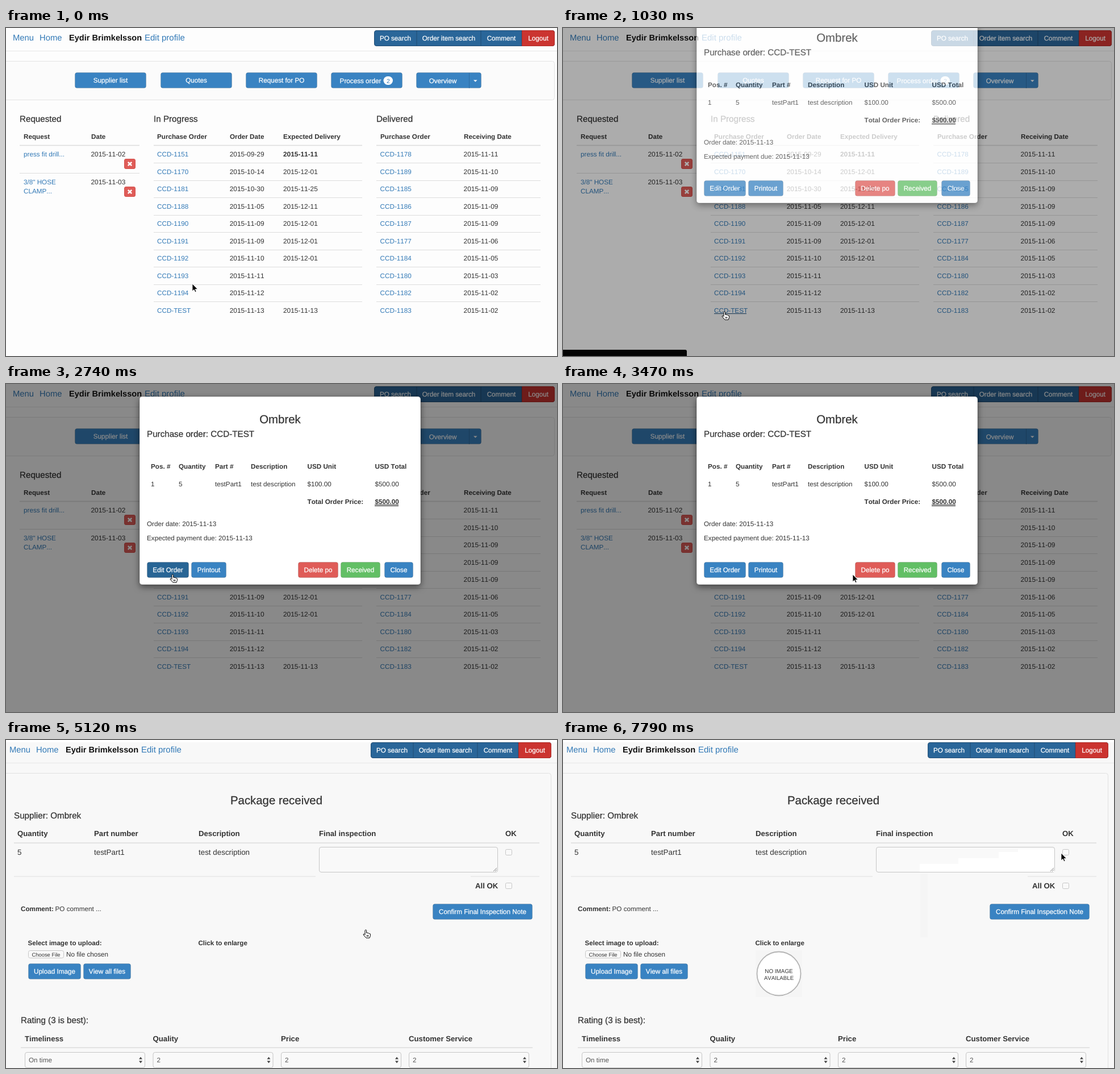
These frames come from a looping animation (970x577 px, 8 s). An HTML page:

```html
<!DOCTYPE html>
<html lang="en">
<head>
<meta charset="utf-8">
<title>Purchase orders</title>
<style>
  html, body { margin: 0; width: 100%; height: 100%; overflow: hidden; background: #fdfdfd; }
  svg { display: block; width: 100%; height: 100%; }
  text {
    font-family: "Liberation Sans", Arial, sans-serif; fill: #333; white-space: pre;
    font-kerning: none; text-rendering: geometricPrecision;
  }
  .b { font-weight: bold; }
  .h { stroke: #333; stroke-width: .25; }
  .link { fill: #337ab7; }
  .mid { text-anchor: middle; }
  .btn { fill: #fff; stroke: #fff; stroke-width: .25; text-anchor: middle; }
</style>
</head>
<body>
<svg id="stage" viewBox="0 0 970 577" xmlns="http://www.w3.org/2000/svg"></svg>
<script>
const LOOP = 8000;
const USER = 'Eydir Brimkelsson', SUPPLIER = 'Ombrek';
const BLUE = '#3983c2', BLUE_DARK = '#286595', RED = '#df5c58', GREEN = '#62bf65';

// Drawing helpers
const esc = s => String(s).replace(/&/g, '&amp;').replace(/</g, '&lt;');
const text = (x, y, s, cls = '', size = 11.7, extra = '') =>
  `<text x="${x}" y="${y}" class="${cls}" font-size="${size}" ${extra}>${esc(s)}</text>`;
const date = (x, y, monthDay, cls = '') => text(x, y, '2015-' + monthDay, cls, 11.9);
const rect = (x, y, w, h, fill, extra = '') =>
  `<rect x="${x}" y="${y}" width="${w}" height="${h}" fill="${fill}" ${extra}/>`;
const hline = (x1, x2, y, w = 1, color = '#ddd') => rect(x1, y, x2 - x1, w, color);
const button = (x, y, w, label, fill = BLUE, id = '') =>
  rect(x + .5, y + .5, w - 1, 27, fill, `rx="3.5" stroke="#000" stroke-opacity=".14" ${id && `id="${id}"`}`) +
  text(x + w / 2, y + 18, label, 'btn');
const group = (id, body, extra = '') => `<g id="${id}" ${extra}>${body}</g>`;

function navBar() {
  const cells = [[648, 'PO search', 75], [723, 'Order item search', 113], [836, 'Comment', 72]];
  return text(12, 22, 'Menu', 'link', 14.8) + text(59, 22, 'Home', 'link', 14.8) +
    text(111, 22, USER, 'b', 14.6, 'style="fill:#111"') + text(244, 22, 'Edit profile', 'link', 15) +
    rect(648.5, 4.5, 317, 27, '#2a6699', 'rx="3.5" stroke="#204d74"') +
    cells.map(([x, s, w]) => text(x + w / 2, 22, s, 'btn') + rect(x + w - .5, 4, 1, 28, '#204d74')).join('') +
    '<path d="M908.5 4.5h53.5q3.5 0 3.5 3.5v20q0 3.5-3.5 3.5h-53.5z" fill="#cb3430" stroke="#b02b27"/>' +
    text(937, 22, 'Logout', 'btn');
}

function deleteBox(y) {
  return rect(208.5, y + .5, 19, 17, RED, 'rx="2.5" stroke="#d5504b"') +
    `<path d="M214.8 ${y + 5.8}l6.4 6.4m0-6.4l-6.4 6.4" stroke="#fff" stroke-width="2.6"/>`;
}

function homePage() {
  const rowY = i => 226 + i * 30.55;
  const progress = [
    ['1151', '09-29', '11-11'], ['1170', '10-14', '12-01'], ['1181', '10-30', '11-25'],
    ['1188', '11-05', '12-11'], ['1190', '11-09', '12-01'], ['1191', '11-09', '12-01'],
    ['1192', '11-10', '12-01'], ['1193', '11-11'], ['1194', '11-12'], ['TEST', '11-13', '11-13']];
  const delivered = [
    ['1178', '11-11'], ['1189', '11-10'], ['1185', '11-09'], ['1186', '11-09'], ['1187', '11-09'],
    ['1177', '11-06'], ['1184', '11-05'], ['1180', '11-03'], ['1182', '11-02'], ['1183', '11-02']];
  let s = rect(0, 0, 970, 577, '#fdfdfd') + navBar() + hline(0, 970, 40, 1, '#e7e7e7') +
    rect(-9.5, 58.5, 975, 68, '#fbfbfb', 'rx="4" stroke="#e3e3e3"');

  ['Supplier list', 'Quotes', 'Request for PO', '', ''].forEach((label, i) =>
    s += button(Math.round(121.4 + i * 150.15), 78, i < 4 ? 126 : 115, label));
  s += text(624, 96.5, 'Process order', 'btn') + rect(664.5, 85, 16.5, 15, '#fff', 'rx="7.5"') +
    text(672.8, 96.6, '2', 'mid link', 10.5) + text(769, 96.5, 'Overview', 'btn') +
    rect(815, 79, 1, 27, '#2e6da4') + '<path d="M823 91.5h6.6l-3.3 3.3z" fill="#fff"/>';

  s += text(24, 165, 'Requested', 'h', 15.2) + text(260, 165, 'In Progress', 'h', 15.2) +
    text(652, 165, 'Delivered', 'h', 15.2);
  [[31, 'Request'], [150, 'Date'], [266, 'Purchase Order'], [394, 'Order Date'],
    [488, 'Expected Delivery'], [659, 'Purchase Order'], [806, 'Receiving Date']]
    .forEach(([x, label]) => s += text(x, 195, label, 'b'));
  [[24, 235], [260, 627], [652, 941]].forEach(([a, b]) => s += hline(a, b, 205.7, 1.6));

  s += text(31, 226, 'press fit drill...', 'link') + date(149.5, 226, '11-02') + deleteBox(230) +
    hline(24, 235, 255) + text(31, 275, '3/8" HOSE', 'link') + text(31, 291, 'CLAMP...', 'link') +
    date(149.5, 275, '11-03') + deleteBox(279);

  progress.forEach(([id, ordered, due], i) => {
    s += text(266, rowY(i), 'CCD-' + id, 'link') + date(393.7, rowY(i), ordered);
    if (due) s += date(488, rowY(i), due, i ? '' : 'b');
  });
  delivered.forEach(([id, day], i) =>
    s += text(658.6, rowY(i), 'CCD-' + id, 'link') + date(805.6, rowY(i), day));
  for (let i = 0; i < 9; i++)
    s += hline(260, 627, Math.round(rowY(i) + 11)) + hline(652, 941, Math.round(rowY(i) + 11));
  return s + rect(266, 502, 57, 1, '#23527c', 'id="underline"');
}

function orderDialog() {
  const heads = [[255, 'Pos. #'], [304, 'Quantity'], [368, 'Part #'], [431, 'Description'],
    [530.5, 'USD Unit'], [649.5, 'USD Total']];
  const cells = ['1', '5', 'testPart1', 'test description', '$100.00', '$500.00'];
  return rect(235, 22, 495, 331, '#fff', 'rx="5" stroke="#000" stroke-opacity=".25" filter="url(#shadow)"') +
    text(482.5, 69, SUPPLIER, 'h mid', 20.4) + text(248, 93, 'Purchase order: CCD-TEST', 'h', 15.2) +
    heads.map(([x, h], i) => text(x, 149, h, 'b') + text(x, 180, cells[i])).join('') +
    text(530.5, 211, 'Total Order Price:', 'b') + text(649.5, 211, '$500.00', 'b') +
    hline(649, 691, 212, 1, '#333') + hline(649, 691, 214, 1, '#333') +
    text(248, 250, 'Order date: 2015-11-13') + text(248, 275, 'Expected payment due: 2015-11-13') +
    button(248, 313, 74, 'Edit Order', BLUE, 'edit') + button(326, 313, 62, 'Printout', BLUE, 'print') +
    button(514, 313, 71, 'Delete po', RED, 'remove') + button(589, 313, 70, 'Received', GREEN, 'receive') +
    button(666, 313, 51, 'Close');
}

function receivedPage() {
  const box = (x, y, w, h, extra = 'rx="3.5"') => rect(x + .5, y + .5, w - 1, h - 1, '#f9f9f9', `stroke="#c6c6c6" ${extra}`);
  const select = (x, value) => box(x, 549, 212, 28) + text(x + 7, 567, value, '', 11.7, 'style="fill:#555"') +
    `<path d="M${x + 201} 561.5h6l-3-4zm0 3h6l-3 4z" fill="#444"/>`;
  const ratings = [[33, 'Timeliness', 'On time'], [258.5, 'Quality', '2'], [484, 'Price', '2'], [709, 'Customer Service', '2']];
  let s = rect(0, 4, 970, 573, '#f8f8f8') + `<g transform="translate(-6 0)">${navBar()}</g>` +
    hline(0, 970, 40, 1, '#e7e7e7') +
    '<path d="M0 58.5H955.5q4 0 4 4V577" fill="none" stroke="#e1e1e1"/>' +
    text(476, 113, 'Package received', 'h mid', 20.4) + text(14, 138, 'Supplier: ' + SUPPLIER, 'h', 15.2);
  [[20, 'Quantity', '5'], [155, 'Part number', 'testPart1'], [339, 'Description', 'test description'],
    [551, 'Final inspection', ''], [879, 'OK', '']]
    .forEach(([x, h, v]) => s += text(x, 169, h, 'b', 13.2) + text(x, 202, v, '', 13.4));
  s += hline(14, 939, 180.3, 1.5) + hline(14, 545, 239.5, 1, '#e2e2e2') + hline(818, 939, 239.5, 1, '#e2e2e2') +
    rect(629, 235, 13, 112, '#f5f5f5', 'id="column"') + box(551, 188, 315, 45) +
    '<path id="trail" clip-path="url(#swept)" fill="#fff" d="M628 218H696V208H767V197H801V192H865V232H628z"/>' +
    '<path d="M858 231l6-6m-3 6l3-3" stroke="#777" stroke-width=".9"/>' +
    box(879, 192, 12, 11, 'rx="2"') + text(826, 261, 'All OK', 'b', 13.2) + box(879, 251, 12, 11, 'rx="2"') +
    text(26, 301, 'Comment:', 'b') + text(86.5, 301, 'PO comment ...') +
    button(751, 288, 176, 'Confirm Final Inspection Note') +
    text(38.5, 361, 'Select image to upload:', 'b', 11.6) + box(39, 370, 63, 14, 'rx="3"') +
    text(70.5, 380.5, 'Choose File', 'mid', 9.4) + text(106, 381, 'No file chosen') +
    button(39, 393, 93, 'Upload Image') + button(136, 393, 84, 'View all files') +
    text(338.5, 361, 'Click to enlarge', 'b', 11.6) +
    group('picture', rect(339, 370, 82, 82, '#f5f5f5') +
      '<circle cx="380" cy="411" r="38.5" fill="#fff" stroke="#b4b4b4" stroke-width="1.8"/>' +
      text(380, 410, 'NO IMAGE', 'mid', 9.9) + text(380, 422, 'AVAILABLE', 'mid', 9.7)) +
    text(26, 498, 'Rating (3 is best):', 'h', 15.2) + hline(26, 927, 540.5, 1.5);
  ratings.forEach(([x, label, value]) => s += text(x, 530, label, 'b', 13.2) + select(x, value));
  return s;
}

const cursors =
  '<path id="arrow" d="M0 0V13L3 10.2L5 14.6L7 13.8L5.1 9.5H9.3z" fill="#000" stroke="#fff" stroke-width=".8"/>' +
  '<path id="hand" d="M-1 8V1.5Q-1 0 .3 0T1.6 1.5V5.2Q4 4.4 4.2 6Q6 5.2 6.4 6.6Q8.4 6 8.4 8V10.5L7 14.2H1L-3.6 9Q-4.4 7.6-3 7.2Q-2 7.2-1 8.6zM2.6 9v3m2-3v3" fill="#fff" stroke="#000"/>' +
  '<path id="beam" d="M-2.5-7Q0-7 0-5Q0-7 2.5-7M0-5.5V7M-2.5 8Q0 8 0 6Q0 8 2.5 8M-1.5 2h3" fill="none" stroke="#222" stroke-width="1.2"/>';

const stage = document.getElementById('stage');
stage.innerHTML =
  '<defs><filter id="shadow" x="-10%" y="-10%" width="120%" height="125%">' +
  '<feDropShadow dx="0" dy="4" stdDeviation="6" flood-opacity=".5"/></filter>' +
  '<clipPath id="swept"><rect id="sweep" x="620" y="180" width="0" height="60"/></clipPath></defs>' +
  rect(0, 0, 970, 577, '#fff') +
  group('home', homePage() + '<path id="dim" fill-rule="evenodd"/>') +
  group('dialog', orderDialog()) + group('received', receivedPage()) +
  group('status', '<path d="M0 566H215q3 0 3 3V577H0z" fill="#050505"/>') +
  group('cursor', cursors);
const el = {};
stage.querySelectorAll('[id]').forEach(node => el[node.id] = node);

// Pointer moves: first step, last step, number of steps, destination
const moves = [
  [60, 60, 1, 296, 471], [210, 560, 7, 284, 499], [1470, 1470, 1, 283, 492],
  [1890, 2680, 15, 290, 335], [2710, 3470, 15, 510, 335], [3530, 3860, 6, 633, 334],
  [5440, 5440, 1, 631, 333], [5680, 6450, 14, 632, 227], [6510, 6510, 1, 632, 226],
  [6920, 7710, 16, 877, 199]];

function pointerAt(t) {
  let x = 328, y = 450;
  for (const [start, end, steps, toX, toY] of moves) {
    if (t < start) break;
    const done = steps === 1 || t >= end ? 1 :
      (Math.floor((t - start) / (end - start) * (steps - 1)) + 1) / steps;
    const k = done * done * (3 - 2 * done);
    x += (toX - x) * k;
    y += (toY - y) * k;
  }
  return { x, y };
}

// Dialog entrance: time, vertical offset, opacity, backdrop
const entrance = [[980, -68, .3, .09], [1030, -45, .75, .32], [1180, -4, 1, .46], [1320, 0, 1, .46]];

// The backdrop leaves the dialog's own area clear
const backdrop = dy => `M0 0H970V577H0zM240 ${22 + dy}h485q5 0 5 5v321q0 5-5 5h-485q-5 0-5-5v-321q0-5 5-5z`;

const show = (node, on) => node.setAttribute('display', on ? 'inline' : 'none');
const paint = (node, color) => node.setAttribute('fill', color);

function render(t) {
  const p = pointerAt(t);
  const inside = (x, y, w, h) => p.x >= x && p.x < x + w && p.y >= y && p.y < y + h;
  const onHome = t < 4910, onReceived = t >= 5120;
  const [, offset, opacity, dimming] = entrance.filter(e => t >= e[0]).pop() || [0, 0, 0, 0];
  const opened = t >= 1320 && onHome;

  const onLink = t < 1320 && inside(266, 489, 57, 15);
  const onEdit = opened && inside(248, 313, 74, 28);
  const onPrint = opened && inside(326, 313, 62, 28);
  const onRemove = opened && inside(514, 313, 71, 28);
  const onReceive = opened && inside(589, 313, 70, 28);

  show(el.home, onHome);
  show(el.dialog, onHome && opacity > 0);
  show(el.received, onReceived);
  el.dialog.setAttribute('transform', `translate(0 ${offset})`);
  el.dialog.setAttribute('opacity', opacity);
  el.dim.setAttribute('d', backdrop(offset));
  el.dim.setAttribute('opacity', dimming);

  show(el.underline, onLink);
  paint(el.edit, onEdit ? BLUE_DARK : BLUE);
  paint(el.print, onPrint ? BLUE_DARK : BLUE);
  paint(el.remove, onRemove ? '#c9302c' : RED);
  paint(el.receive, onReceive ? '#49a44c' : GREEN);
  show(el.status, t >= 380 && t < 1470 && p.y > 488 ||
    t >= 2830 && t < 3250 || t >= 3750 && onHome);

  show(el.picture, t >= 5440);
  const top = Math.max(235, p.y);
  el.column.setAttribute('y', top);
  el.column.setAttribute('height', Math.max(0, 347 - top));
  el.sweep.setAttribute('width', t >= 6920 ? Math.max(0, p.x - 616) : 0);

  const beam = onReceived && inside(551, 188, 315, 45);
  const hand = onLink && t < 1180 || onEdit || onPrint || onRemove || onReceive || t >= 4910 && t < 5440;
  show(el.beam, beam);
  show(el.hand, hand);
  show(el.arrow, !beam && !hand);
  el.cursor.setAttribute('transform', `translate(${Math.round(p.x)} ${Math.round(p.y)})`);
}

function tick() {
  render(performance.now() % LOOP);
  requestAnimationFrame(tick);
}
tick();
</script>
</body>
</html>
```
